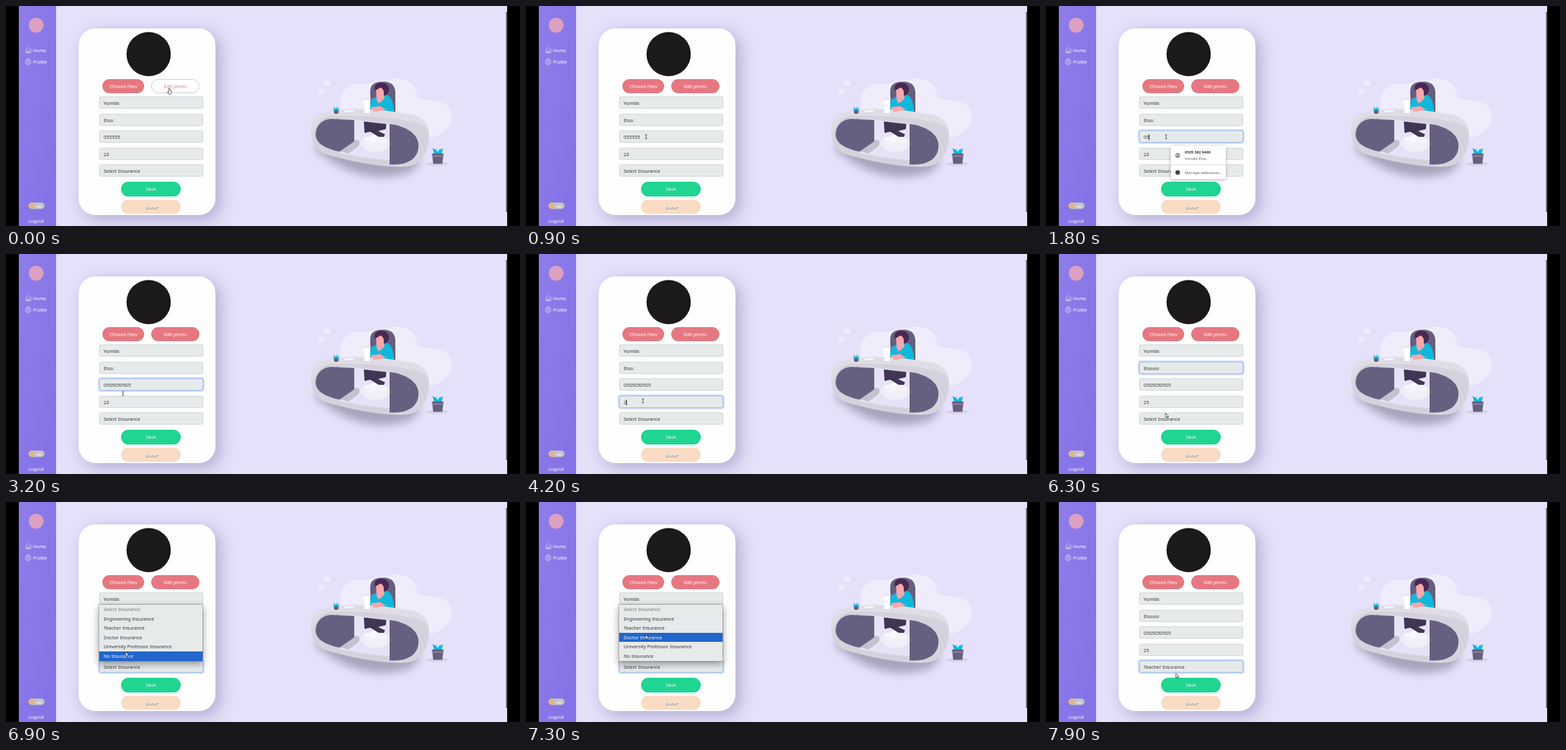
These frames come from a looping animation (800x343 px, 8000 ms). An HTML page:

```html
<!DOCTYPE html>
<html lang="en">
<head>
<meta charset="utf-8">
<title>Edit profile</title>
<style>
html, body { margin: 0; width: 100%; height: 100%; overflow: hidden; background: #000; }
#stage { position: relative; width: 800px; height: 343px; overflow: hidden; font: 7.4px/10px "Noto Sans", "Open Sans", sans-serif; color: #2f3235; }
#stage div, #stage svg { position: absolute; box-sizing: border-box; white-space: pre; }
#stage svg { left: 0; top: 0; }
#page { left: 20px; top: 0; width: 760px; height: 343px; background: #e5e1fa; }
#side { left: 20px; top: 0; width: 58px; height: 343px; background: linear-gradient(100deg, #8d7dea, #8472e6); }
#scroll { left: 778px; top: 9px; width: 2px; height: 312px; background: #77737f; }
#card { left: 113px; top: 35px; width: 213px; height: 291px; border-radius: 26px; background: #fefefe; box-shadow: 7px 7px 26px rgba(83, 72, 130, .36); }
.nav { color: #fff; font-size: 7.2px; }
.btn { height: 22px; line-height: 23px; border-radius: 12px; text-align: center; color: #fff; background: #e67780; }
#edit.hover { background: #fefefe; border: 1px solid #d5c9dc; line-height: 21px; color: #dc8088; }
#save { left: 179px; top: 274px; width: 93px; height: 23px; background: #20d491; }
#done { left: 179px; top: 302px; width: 93px; background: #f9dcc3; font-weight: 700; text-shadow: 1px 1px 1px #77706c; }
.field { left: 145px; width: 162px; height: 19px; padding-left: 6px; line-height: 18px; border: 1px solid #cfd5d6; border-radius: 3px; background: #e6eaea; }
.caret { display: inline-block; width: 1px; height: 9px; margin-right: -1px; vertical-align: -2px; background: #222; }
#popup { left: 194px; width: 86px; height: 52px; border-radius: 2px; background: #fff; box-shadow: 0 1px 4px rgba(40, 40, 60, .38); font-size: 6.1px; color: #5b5b5e; }
#popup div { left: 22px; }
#popup #hint { top: 4.5px; font-weight: 700; font-size: 5.9px; color: #333; }
#popup #rule { left: 0; top: 29px; width: 86px; height: 1px; background: #dcdcdf; }
#list { left: 145px; top: 160px; width: 161px; height: 88px; background: #e6eaea; box-shadow: 0 0 0 .5px #777b80, 0 4px 11px rgba(0, 0, 0, .42); }
#list div { left: 0; width: 161px; height: 14.6px; padding-left: 7px; line-height: 14.6px; }
#list .on { background: #2166cb; color: #fff; }
</style>
</head>
<body>
<div id="stage">
  <div id="page"></div>
  <svg width="800" height="343">
    <defs>
      <filter id="soft" x="-20%" y="-50%" width="140%" height="200%"><feGaussianBlur stdDeviation="7"/></filter>
    </defs>
    <g fill="#efecfc">
      <path d="M522 166C515 143 527 121 549 122C570 124 588 112 612 113C637 116 636 132 641 142C651 151 681 143 691 160C701 188 678 205 641 211L550 210Z"/>
      <rect x="495" y="116" width="10" height="8" rx="3"/>
      <rect x="487" y="129" width="8" height="8" rx="3"/>
    </g>
    <path d="M479 222Q555 286 632 258L646 240L500 207Z" fill="#77718c" opacity=".55" filter="url(#soft)"/>
    <!-- person on chair -->
    <path d="M567 166V132Q567 118 587 118Q606 118 606 136V166Z" fill="#665f80"/>
    <path d="M566 164L568 146L577 141L592 138Q602 140 604 164Z" fill="#12b8dc"/>
    <path d="M574 131C572 123 579 118 587 120C596 121 599 131 593 138L587 141L577 132Z" fill="#48294f"/>
    <path d="M576 131L583 127Q589 130 588 137L589 145L580 152L577 147Z" fill="#f8a6ab"/>
    <!-- desk -->
    <path d="M475 193C474 173 489 165 514 163C565 157 606 165 632 170C653 174 660 188 658 207C656 237 640 252 612 251C573 250 532 241 501 232C483 227 475 215 475 193Z" fill="#d4d2dc"/>
    <path d="M475 193C474 173 489 165 514 163C565 157 606 165 632 170C648 173 655 181 657 192C648 177 570 170 511 171Q479 173 477 207Z" fill="#dfdde5"/>
    <path d="M542 177L598 184V240Q565 239 518 229L542 211Z" fill="#e7e3f6"/>
    <path d="M518 226L545 208L551 212L548 219L533 230Z" fill="#c4c0d0"/>
    <ellipse cx="575" cy="214" rx="23" ry="13" fill="#f1eefa"/>
    <path d="M574 195V211M558 209L575 203L590 212M575 204L567 215" fill="none" stroke="#fafafe" stroke-width="3"/>
    <path d="M557 180L592 184L591 192L579 195L590 200L588 204L580 204L567 196L558 198Z" fill="#403553"/>
    <path d="M482 200C482 187 492 176 507 176L542 178V211L519 227C496 222 482 214 482 200Z" fill="#665f80"/>
    <path d="M597 184C622 187 642 199 642 218C642 237 626 249 597 247Z" fill="#665f80"/>
    <path d="M567 158L583 156L591 162L573 165Z" fill="#fba7aa"/>
    <path d="M557 145H567L566 167H558Z" fill="#fff"/>
    <path d="M556.500 143H567.500V146H556.500Z" fill="#e4e1ec"/>
    <path d="M526 163L540 162L542 164L530 166Z" fill="#faf9fd"/>
    <!-- plants -->
    <path d="M510 162H518L517 168H511Z" fill="#665f80"/>
    <path d="M509 158L513 160L514 156L515 160L519 158L517 163H511Z" fill="#12b8dc"/>
    <ellipse cx="671" cy="246" rx="16" ry="3" fill="#d3cee6"/>
    <path d="M663 230H681L679 246H665Z" fill="#665f80"/>
    <path d="M663.500 233H680.500V235H663.700Z" fill="#8a83a0"/>
    <path d="M664 222L670 224L672 228L674 224L680 222L678 230H666Z" fill="#12b8dc"/>
  </svg>
  <div id="side"></div>
  <div id="scroll"></div>
  <div id="card"></div>
  <svg width="330" height="343">
    <circle cx="47" cy="30" r="11.500" fill="#dda0c0"/>
    <circle cx="222" cy="75" r="34.500" fill="#1b191a"/>
    <g fill="none" stroke="#f4f1ff" stroke-width=".7">
      <path d="M30.500 69L35 64.500L39.500 69M31.500 68V73H38.500V68M34 73V70H36V73"/>
      <circle cx="34.500" cy="87" r="4.300"/>
      <circle cx="34.500" cy="85.500" r="1.600"/>
      <path d="M31.500 90Q34.500 86.500 37.500 90"/>
    </g>
    <rect x="35" y="306.500" width="25" height="10" rx="5" fill="#c7c4c8"/>
    <circle cx="40" cy="311.500" r="4.700" fill="#e4b781"/>
    <path d="M49 313H55" stroke="#ebe9ed" stroke-width="2"/>
  </svg>
  <div class="nav" style="left:42px;top:64px">Home</div>
  <div class="nav" style="left:42px;top:82px">Profile</div>
  <div class="nav" style="left:35px;top:330px">Logout</div>
  <div class="btn" style="left:150px;top:114px;width:65px">Choose Files</div>
  <div class="btn" id="edit" style="left:226px;top:114px;width:75px">Edit photo</div>
  <div class="btn" id="save">Save</div>
  <div class="btn" id="done">Done</div>
  <div id="form"></div>
  <div id="popup">
    <svg width="86" height="52" fill="none" stroke="#444">
      <circle cx="11" cy="15" r="3.200"/>
      <circle cx="11" cy="14" r="1" fill="#444" stroke="none"/>
      <path d="M9 17Q11 15 13 17"/>
      <circle cx="11" cy="41.500" r="3.600" fill="#444" stroke="none"/>
    </svg>
    <div id="hint"></div>
    <div style="top:14.500px">Vunida Eloo</div>
    <div id="rule"></div>
    <div style="top:36.500px">Manage addresses...</div>
  </div>
  <div id="list"></div>
  <svg id="pointer" width="14" height="16" style="overflow:visible">
    <path id="shape" stroke-width=".8" stroke-linejoin="round"/>
  </svg>
</div>
<script>
const LOOP = 8000, STEP = 100, BLINK = 500, FADE = 150, ROW = 14.6;
const $ = id => document.getElementById(id);

const options = ['Select', 'Engineering', 'Teacher', 'Doctor', 'University Professor', 'No'].map(s => s + ' Insurance');
const phone = '0505050505';

// Each row: [start, value]
const typed = [
  [[0, 'Vunida']],
  [[0, 'Eloo'], [5600, 'Elooo'], [5800, 'Eloooo']],
  [[0, '055555'], [1200, '05555'], [1300, '0555'], [1500, '055'], [1700, '05'],
    ...[1900, 2000, 2100, 2200, 2300, 2500, 2600, 2700].map((t, i) => [t, phone.slice(0, i + 3)])],
  [[0, '23'], [3900, '2'], [4400, '25']],
  [[0, options[0]], [7600, options[2]]]
];
const focus = [[0, -1], [1000, 2], [3500, 3], [5200, 1], [6500, 4]];
const popups = [[0, null], [1700, { top: 218, hint: '0505 382 9460' }], [2200, null],
  [5200, { top: 191.5, hint: 'Eloo' }], [5800, null]];
const opened = [[0, false], [6600, true], [7600, false]];
const kinds = [[0, 'hand'], [300, 'arrow'], [800, 'beam'], [5900, 'arrow']];
const path = [[0, 253, 128], [100, 253, 128], [900, 187, 204], [2700, 187, 204], [3100, 182, 214],
  [3400, 182, 229], [4500, 182, 229], [5100, 179, 175], [5800, 179, 175], [6000, 184, 235],
  [6200, 184, 235], [6300, 186, 248], [6700, 186, 248], [7200, 186, 207], [7300, 186, 207],
  [7500, 188, 197], [7600, 188, 197], [7900, 202, 267], [8000, 202, 267]];
const shapes = {
  arrow: ['M0 0V7L1.700 5.500L2.800 8L3.900 7.500L2.900 5.200H5Z', '#fff', '#333'],
  hand: ['M0 1Q1 -.5 2 1V4L4.500 4.500V8L3.500 9.500H.5L-1.500 6L0 6.500Z', '#fff', '#333'],
  beam: ['M-1.500 -3H1.500M0 -3V3M-1.500 3H1.500', 'none', '#333']
};

const rowAt = (rows, t) => rows.findLast(r => r[0] <= t);
const at = (rows, t) => rowAt(rows, t)[1];
const show = (el, on) => el.style.display = on ? '' : 'none';
const add = (parent, cls, top) => {
  const el = document.createElement('div');
  el.className = cls;
  el.style.top = top + 'px';
  return parent.appendChild(el);
};

const fields = typed.map((_, i) => add($('form'), 'field', 141.4 + 26.4 * i));
const labels = fields.map(f => f.appendChild(document.createElement('span')));
const caret = document.createElement('span');
caret.className = 'caret';
const items = options.map((s, i) => {
  const el = add($('list'), '', ROW * i);
  el.textContent = s;
  return el;
});
items[0].style.color = '#777';

function pointerAt(t) {
  const i = path.findLastIndex(p => p[0] <= t);
  const [t0, x0, y0] = path[i], [t1, x1, y1] = path[i + 1];
  const u = (t - t0) / (t1 - t0), k = u * u * (3 - 2 * u);
  return [x0 + (x1 - x0) * k, y0 + (y1 - y0) * k];
}

function drawFields(t) {
  const row = rowAt(focus, t), active = row[1];
  const last = focus[focus.indexOf(row) - 1];
  const fade = Math.min(1, (t - row[0]) / FADE);
  fields.forEach((f, i) => {
    labels[i].textContent = at(typed[i], t);
    const a = i === active ? fade : last && i === last[1] ? 1 - fade : 0;
    f.style.borderColor = a > .5 ? '#9dbcec' : '';
    f.style.boxShadow = a ? `0 0 0 2px rgba(70, 130, 245, ${.27 * a})` : '';
  });
  caret.remove();
  if (active < 0 || active > 3) return;
  const since = t - Math.max(row[0], rowAt(typed[active], t)[0]);
  if (since % (2 * BLINK) < BLINK) fields[active].append(caret);
}

function draw(t) {
  const [x, y] = pointerAt(t);
  drawFields(t);
  $('edit').classList.toggle('hover', x > 226 && y < 136 && y > 114);

  const popup = at(popups, t);
  show($('popup'), popup);
  if (popup) {
    $('popup').style.top = popup.top + 'px';
    $('hint').textContent = popup.hint;
  }

  show($('list'), at(opened, t));
  const over = Math.floor((y - 160) / ROW);
  items.forEach((el, i) => el.classList.toggle('on', i > 0 && i === over));

  const [d, fill, stroke] = shapes[at(kinds, t)];
  $('shape').setAttribute('d', d);
  $('shape').setAttribute('fill', fill);
  $('shape').setAttribute('stroke', stroke);
  $('pointer').style.transform = `translate(${x}px, ${y}px)`;
}

function tick() {
  const t = performance.now() % LOOP;
  draw(Math.floor(t / STEP) * STEP);
  requestAnimationFrame(tick);
}
tick();
</script>
</body>
</html>
```
